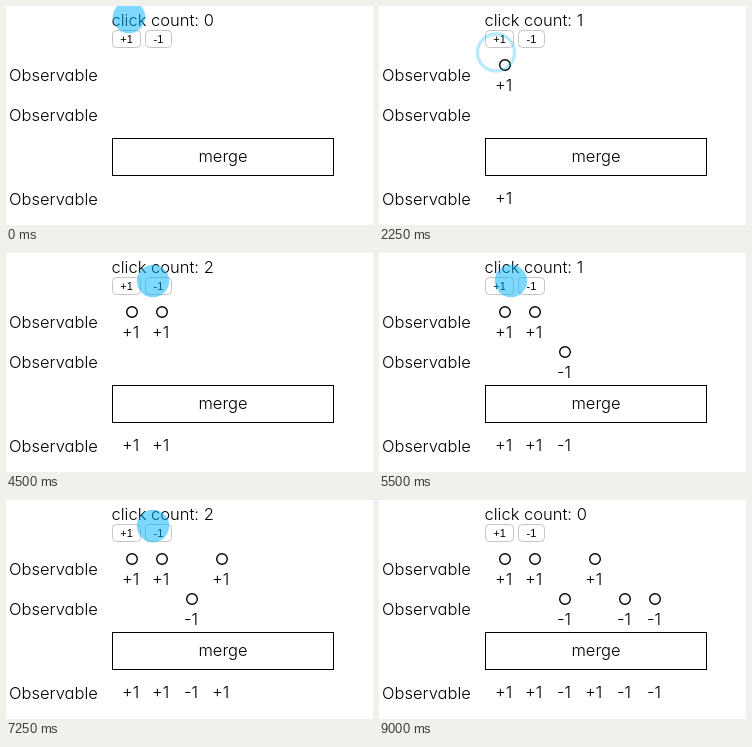
Animation of 367 by 219 pixels, one loop 9.75 s. Source, as an HTML page:

```html
<!DOCTYPE html>
<html lang="en">
<head>
<meta charset="utf-8">
<title>Merge marbles</title>
<style>
  html, body { margin: 0; width: 100%; height: 100%; overflow: hidden; background: #fff; }
  svg { display: block; width: 367px; height: 219px; }
  text { font: 300 16.5px Inter, "Open Sans", sans-serif; font-feature-settings: "cv11"; }
  .button rect { fill: #fff; stroke: #c4c4c4; }
  .button text { font: 11px "Liberation Sans", sans-serif; text-anchor: middle; }
  .marble circle { fill: none; stroke: #000; stroke-width: 1.4; }
  .box { fill: none; stroke: #000; }
  #pointer { fill: #00b4ff; }
  #ring { fill: none; stroke: #00b0e8; stroke-width: 3.4; }
</style>
</head>
<body>
<svg viewBox="0 0 367 219">
  <text id="count" x="105.5" y="20">click count: 0</text>
  <g class="button">
    <rect x="106.5" y="24.5" width="28" height="17" rx="4"/>
    <text x="120.5" y="37">+1</text>
  </g>
  <g class="button">
    <rect x="139.5" y="24.5" width="26" height="17" rx="4"/>
    <text x="152.5" y="37">-1</text>
  </g>
  <text x="3" y="75">Observable</text>
  <text x="3" y="115">Observable</text>
  <text x="3" y="199">Observable</text>
  <rect class="box" x="106.5" y="132.5" width="221" height="37"/>
  <text x="217" y="156" text-anchor="middle">merge</text>
  <g id="marbles"></g>
  <circle id="pointer" r="16"/>
  <circle id="ring"/>
</svg>
<script>
  const LOOP = 9750, STEP = 250;
  const PLUS = 117, MINUS = 147;
  const $ = id => document.getElementById(id);

  const clicks = [[2250, 1], [3500, 1], [5000, -1], [6250, 1], [8000, -1], [8750, -1]];

  const solid = (x, y = 28) => ({ id: 'pointer', x, y, r: 16.2, opacity: 0.5 });
  const ring = (x, r = 18.5, opacity = 0.27) => ({ id: 'ring', x, y: 46.5, r, opacity });

  // Each pose holds until the next one.
  const poses = [
    [0, solid(123, 11)], [250, solid(93, -4)], [500, null],
    [1000, solid(181)], [1250, solid(150)], [1500, solid(126)], [1750, solid(120)],
    [2000, ring(PLUS, 21)], [2250, ring(PLUS)], [2500, ring(PLUS, 17, 0.12)], [2750, null],
    [3000, ring(PLUS, 20)], [3500, ring(PLUS)], [3750, null],
    [4000, solid(122)], [4250, solid(138)], [4500, solid(147)],
    [4750, ring(MINUS, 20)], [5000, ring(MINUS)], [5250, null],
    [5500, solid(132)], [5750, solid(120)],
    [6000, ring(PLUS, 19)], [6250, ring(PLUS)], [6500, null],
    [6750, solid(120)], [7000, solid(130)], [7250, solid(147, 26)], [7500, solid(149)],
    [7750, ring(MINUS, 20)], [8000, ring(MINUS)], [8250, null],
    [8500, ring(MINUS, 20)], [8750, ring(MINUS)], [9000, null]
  ];

  const marbles = clicks.map(([, sign], i) => {
    const group = document.createElementNS('http://www.w3.org/2000/svg', 'g');
    const left = 30 * i, up = sign > 0;
    const x = left + (up ? 116 : 118);
    const y = up ? 59 : 99;
    const label = up ? '+1' : '-1';
    group.setAttribute('class', 'marble');
    group.innerHTML = `<circle cx="${126 + left}" cy="${y}" r="5.3"/>
      <text x="${x}" y="${y + 26}">${label}</text>
      <text x="${x}" y="198">${label}</text>`;
    $('marbles').append(group);
    return group;
  });

  function draw(now) {
    const time = Math.floor((now % LOOP) / STEP) * STEP;
    let count = 0;
    clicks.forEach(([at, sign], i) => {
      const shown = time >= at;
      if (shown) count += sign;
      marbles[i].style.visibility = shown ? 'visible' : 'hidden';
    });
    $('count').textContent = `click count: ${count}`;

    const pose = poses.filter(([at]) => at <= time).pop()[1];
    for (const id of ['pointer', 'ring']) {
      const active = pose && pose.id === id;
      $(id).style.visibility = active ? 'visible' : 'hidden';
      if (!active) continue;
      $(id).setAttribute('cx', pose.x);
      $(id).setAttribute('cy', pose.y);
      $(id).setAttribute('r', pose.r);
      $(id).setAttribute('opacity', pose.opacity);
    }
  }

  const start = performance.now();
  function tick() {
    draw(performance.now() - start);
    requestAnimationFrame(tick);
  }
  tick();
</script>
</body>
</html>
```
